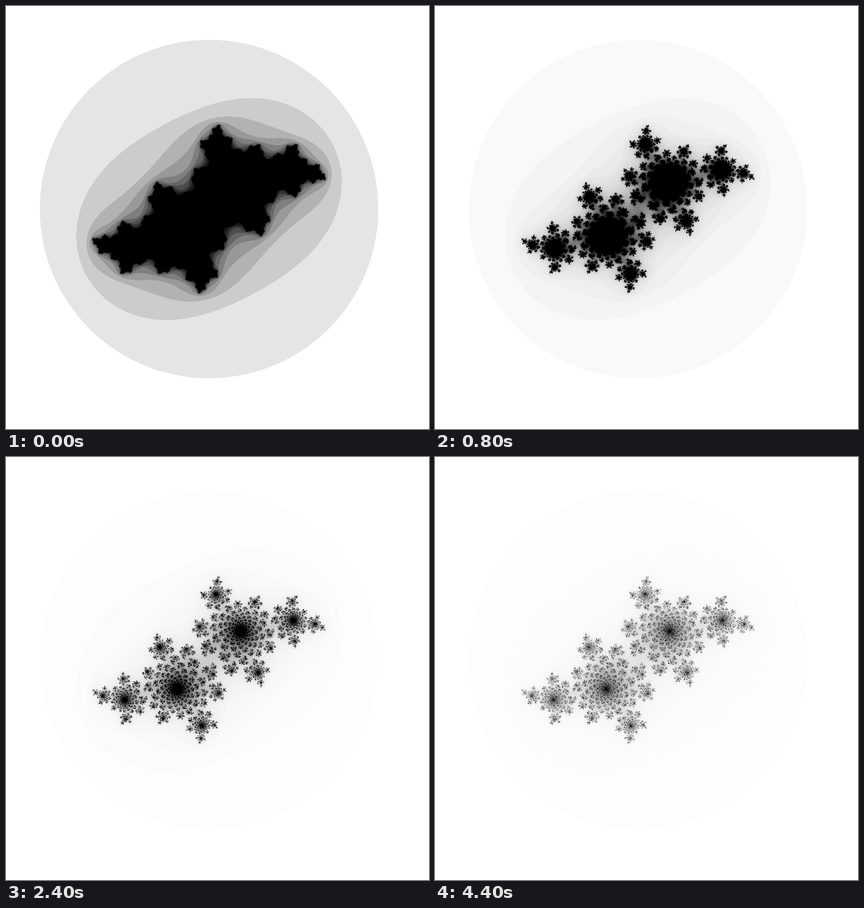
Write an HTML page with a canvas that moves like this. It is 748 px wide and 748 px high and loops after 4.8 s.

```html
<!DOCTYPE html>
<html lang="en">
<head>
<meta charset="utf-8">
<title>Julia set by iteration depth</title>
<style>
  html, body { margin: 0; width: 100%; height: 100%; overflow: hidden; background: #fff; }
  canvas { display: block; width: 748px; height: 748px; }
</style>
</head>
<body>
<canvas id="stage" width="748" height="748"></canvas>
<script>
const SIZE = 748;
const SPAN = 5, MIN = -2.4;
const C_RE = -0.4, C_IM = 0.6;
const STEPS = 24, STEP_MS = 200, DEPTH_STEP = 10;
const MAX_DEPTH = STEPS * DEPTH_STEP;

const ctx = document.getElementById('stage').getContext('2d');
const image = ctx.createImageData(SIZE, SIZE);
const pixels = new Uint32Array(image.data.buffer);

const coord = i => MIN + SPAN * (i + 0.5) / SIZE;

function escapeTime(x, y) {
  let n = 0, xx = x * x, yy = y * y;
  while (n < MAX_DEPTH && xx + yy <= 4) {
    y = 2 * x * y + C_IM;
    x = xx - yy + C_RE;
    xx = x * x;
    yy = y * y;
    n++;
  }
  return n;
}

// Escape times never change; only the depth they are shaded against does.
const times = new Uint8Array(SIZE * SIZE);
for (let j = 0; j < SIZE; j++) {
  for (let i = 0; i < SIZE; i++) times[j * SIZE + i] = escapeTime(coord(i), coord(j));
}

function draw(depth) {
  const shades = new Uint32Array(MAX_DEPTH + 1);
  for (let n = 0; n <= MAX_DEPTH; n++) {
    const grey = Math.floor(255 * (1 - Math.min(n, depth) / depth));
    shades[n] = (0xff000000 | grey * 0x010101) >>> 0;
  }
  for (let p = 0; p < pixels.length; p++) pixels[p] = shades[times[p]];
  ctx.putImageData(image, 0, 0);
}

let shown = -1;
function tick() {
  const step = Math.floor(performance.now() / STEP_MS) % STEPS;
  if (step !== shown) {
    shown = step;
    draw((step + 1) * DEPTH_STEP);
  }
  requestAnimationFrame(tick);
}
tick();
</script>
</body>
</html>
```
